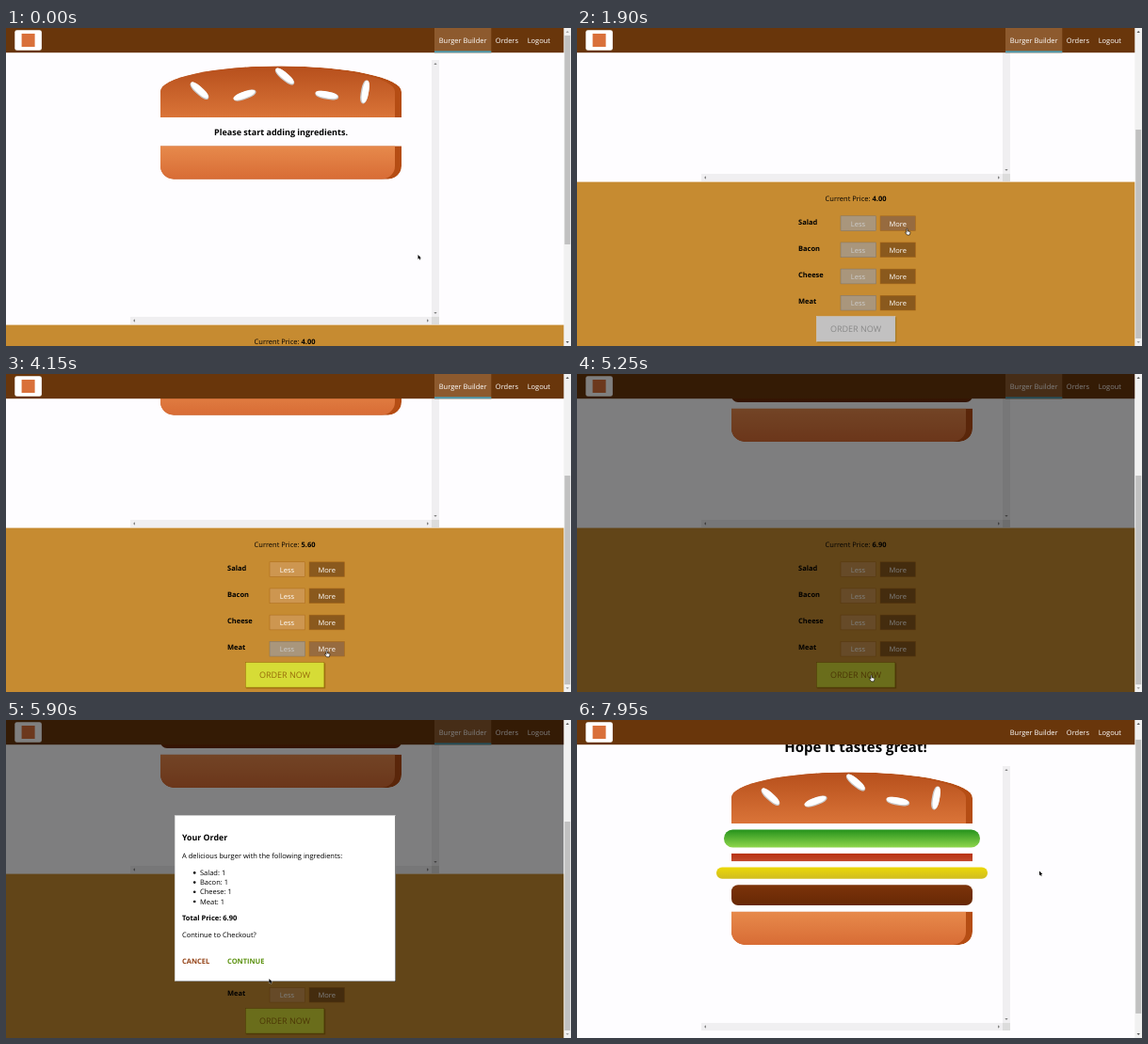
Write an HTML page that moves like this. It is 600x338 px and loops after 8 s.

```html
<!DOCTYPE html>
<html lang="en">
<head>
<meta charset="utf-8">
<title>Burger Builder</title>
<style>
  html, body { margin: 0; width: 100%; height: 100%; overflow: hidden; background: #fefdff; }
  svg { display: block; width: 100vw; height: 100vh; }
  text { font: 7.5px 'Open Sans', sans-serif; text-rendering: geometricPrecision; white-space: pre; }
  .b { font-weight: 700; }
  .mid { text-anchor: middle; }
</style>
</head>
<body>
<svg id="stage" viewBox="0 0 600 338" xmlns="http://www.w3.org/2000/svg"></svg>
<script>
const LOOP = 8000, PAGE_SCROLL = 152;
const MODAL_AT = 5250, LEAVE_AT = 6200, CHECKOUT_AT = 7700;

// name, price, time added, burger layer: width, height, radius, colours
const ITEMS = [
  { name: 'Salad',  price: 0.5, at: 2400, w: 272, h: 19.1, r: 9.4, c: ['#25921c', '#8fd64c'] },
  { name: 'Bacon',  price: 0.7, at: 3050, w: 256, h: 8.2,  r: 0,   c: ['#b83212', '#c2492c'] },
  { name: 'Cheese', price: 0.4, at: 3750, w: 288, h: 12.3, r: 6.1, c: ['#ecd808', '#d0bd20'] },
  { name: 'Meat',   price: 1.3, at: 4400, w: 256, h: 21.8, r: 7,   c: ['#7c330a', '#672805'] }
];
const SEEDS = [[205.5, 66.8, 42], [253.6, 71.6, -20], [296, 51.6, 40], [340.8, 71.6, 10], [381, 68, 100]];
// time, x, y of the pointer tip
const POINTER = [
  [0, 437.5, 241], [1300, 437.5, 241], [2050, 340.5, 210], [2550, 340.5, 210], [2750, 340.5, 238],
  [3250, 340.5, 238], [3500, 340.5, 266], [3900, 340.5, 266], [4150, 340.5, 294], [4550, 340.5, 294],
  [4900, 312.5, 320], [5650, 312.5, 320], [6050, 264.3, 254.5], [6500, 264.3, 254.5],
  [6800, 320, 235], [7500, 491, 160.5], [8000, 491, 160.5]
];

const rect = (x, y, w, h, fill, more = '') =>
  `<rect x="${x}" y="${y}" width="${w}" height="${h}" fill="${fill}" ${more}/>`;
const text = (x, y, str, cls = '', more = '') =>
  `<text x="${x}" y="${y}" class="${cls}" ${more}>${str}</text>`;
const gradient = (id, [a, b]) =>
  `<linearGradient id="${id}" x2="0" y2="1"><stop stop-color="${a}"/><stop offset="1" stop-color="${b}"/></linearGradient>`;
const arrow = (x, y, turn, id = '') =>
  `<path id="${id}" d="M-1.7 1L0-1 1.7 1Z" fill="#858585" transform="translate(${x} ${y}) rotate(${turn})"/>`;
const rowY = i => 199.8 + i * 28.15;

function bun(id, d) {
  return `<clipPath id="${id}Clip"><path d="${d}"/></clipPath>
    <g clip-path="url(#${id}Clip)"><path d="${d}" fill="#b54d14"/>
    <path d="${d}" fill="url(#${id}Fill)" transform="translate(-7)"/></g>`;
}

function seed([x, y, turn]) {
  const shape = fill => rect(-12.5, -4.1, 25, 8.2, fill, 'rx="10" ry="3.6"');
  return `<g transform="translate(${x} ${y}) rotate(${turn})">${shape('#c9c9c9')}
    ${rect(-12.5, -4.1, 24, 6.9, '#fff', 'rx="9.6" ry="3.2"')}</g>`;
}

function burger() {
  const layers = ITEMS.map((m, i) =>
    rect(292 - m.w / 2, 0, m.w, m.h, `url(#layer${i})`, `id="item${i}" rx="${m.r}"`)).join('');
  return `<g id="burger">
    ${bun('top', 'M164 95V67.7A128 27.3 0 0 1 420 67.7V95Z')}${SEEDS.map(seed).join('')}
    ${text(292, 113.6, 'Please start adding ingredients.', 'b mid', 'id="hint" style="font-size:9px"')}
    ${layers}
    <g id="bottom">${bun('base', 'M164 0H420V21.5A14 14 0 0 1 406 35.5H178A14 14 0 0 1 164 21.5Z')}</g>
    ${rect(452, 34, 8, 273, '#f0eff1')}${rect(132, 307, 320, 8, '#f0eff1')}${rect(452, 307, 8, 8, '#dcdcdc')}
    ${arrow(456, 38, 0)}${arrow(456, 303, 180)}${arrow(136, 311, -90)}${arrow(448, 311, 90)}
  </g>`;
}

function footer() {
  const rows = ITEMS.map((m, i) => {
    const y = rowY(i);
    return text(235, y + 8.7, m.name, 'b')
      + rect(280, y, 37.5, 15.8, '', `id="less${i}" stroke-width=".5"`)
      + text(298.5, y + 10.9, 'Less', 'mid', `id="lessText${i}"`)
      + rect(322, y, 37.5, 15.8, '', `id="more${i}" stroke="#aa6817" stroke-width=".5"`)
      + text(340.7, y + 10.9, 'More', 'mid', 'fill="#fff"');
  }).join('');
  return `<g id="footer" transform="translate(0 ${PAGE_SCROLL})">
    ${rect(0, 163.6, 600, 176, '#c68b31')}
    ${text(296, 183.8, 'Current Price: <tspan id="price" class="b"></tspan>', 'mid')}${rows}
    ${rect(255.2, 307.4, 84, 27, '#966909', 'id="orderShadow" opacity=".8"')}
    ${rect(254.3, 306.5, 83.6, 26.6, '', 'id="order" stroke-width=".5"')}
    ${text(296, 323.2, 'ORDER NOW', 'mid', 'id="orderText" style="font-size:9px"')}
  </g>`;
}

function modal() {
  const list = ITEMS.map((m, i) => {
    const y = 165 + i * 10.2;
    return `<circle cx="200.2" cy="${y - 2.6}" r="1.3"/>` + text(206, y, m.name + ': 1');
  }).join('');
  return `<g id="modal">
    ${rect(179.8, 102, 234, 176, '#000')}
    ${rect(179.2, 101.4, 234, 176, '#fff', 'stroke="#ccc" stroke-width=".5"')}
    ${text(187, 127.7, 'Your Order', 'b', 'style="font-size:8.8px"')}
    ${text(187, 147, 'A delicious burger with the following ingredients:')}${list}
    ${text(187, 213.4, 'Total Price: 6.90', 'b')}
    ${text(187, 231.3, 'Continue to Checkout?')}
    ${text(187, 258.5, 'CANCEL', 'b', 'fill="#944317"')}${text(235, 258.5, 'CONTINUE', 'b', 'fill="#5c9210"')}
  </g>`;
}

document.getElementById('stage').innerHTML = `
  <defs>
    ${gradient('topFill', ['#b64f1c', '#da7438'])}${gradient('baseFill', ['#e78a4c', '#d86c35'])}
    ${ITEMS.map((m, i) => gradient('layer' + i, m.c)).join('')}
  </defs>
  ${rect(0, 0, 600, 338, '#fefdff')}
  <g id="scene">
    ${text(296, 49, 'Hope it tastes great!', 'b mid', 'id="heading" style="font-size:15px"')}
    ${burger()}${footer()}
  </g>
  ${rect(0, 0, 600, 26.2, '#69360b')}
  ${rect(9.3, 2.2, 28.6, 21.6, '#fff', 'rx="2.4"')}${rect(16.6, 6, 14, 14, '#d9703a')}
  <g id="nav" fill="#fff">
    <g id="active">${rect(455, 0, 60.3, 26.2, '#8d5a2e')}${rect(455, 24.4, 60.3, 1.8, '#4a9fb8')}</g>
    ${text(459.7, 15.5, 'Burger Builder')}${text(519.8, 15.5, 'Orders')}${text(553.7, 15.5, 'Logout')}
  </g>
  ${rect(0, 0, 592.5, 338, '#000', 'id="backdrop" opacity=".5"')}
  ${modal()}
  <g id="bar">
    ${rect(592.3, 0, 7.7, 338, '#f1f1f1')}${rect(593.2, 0, 6, 222, '#c1c1c1', 'id="thumb"')}
    ${arrow(596.2, 4, 0, 'up')}${arrow(596.2, 334, 180, 'down')}
  </g>
  <g id="pointer">
    <path id="tip" d="M0 0V4.7L1.1 3.7 1.9 5.4 2.7 5.1 1.9 3.4H3.4Z" stroke="#fff" stroke-width=".5" paint-order="stroke"/>
    <path id="hand" d="M-.5.5Q0-.3.6.5V2.7L3 3.2Q3.6 3.5 3.4 4.6L2.8 6.8H.1L-1.9 4.3Q-1.8 3.4-1.1 3.7L-.5 4.3Z"
      fill="#fff" stroke="#000" stroke-width=".6"/>
  </g>`;

const ui = {};
document.querySelectorAll('#stage [id]').forEach(el => { ui[el.id] = el; });
const set = (id, attrs) => { for (const k in attrs) ui[id].setAttribute(k, attrs[k]); };
const show = (id, on) => set(id, { display: on ? 'inline' : 'none' });
const move = (id, x, y) => set(id, { transform: `translate(${x} ${y})` });

const clamp = v => Math.min(1, Math.max(0, v));
const smooth = (t, a, b) => { const p = clamp((t - a) / (b - a)); return p * p * (3 - 2 * p); };

// CSS ease-out: cubic-bezier(0, 0, .58, 1)
function easeOut(p) {
  let lo = 0, hi = 1;
  for (let i = 0; i < 24; i++) {
    const s = (lo + hi) / 2;
    if (1.74 * (1 - s) * s * s + s ** 3 < p) lo = s; else hi = s;
  }
  return lo * lo * (3 - 2 * lo);
}

function pointerAt(t) {
  const i = POINTER.findIndex((k, n) => n && t <= k[0]);
  const [t0, x0, y0] = POINTER[i - 1], [t1, x1, y1] = POINTER[i];
  const p = smooth(t, t0, t1);
  return [x0 + (x1 - x0) * p, y0 + (y1 - y0) * p];
}

function render(t) {
  const building = t < LEAVE_AT, checkout = t >= CHECKOUT_AT;
  const dialog = t > MODAL_AT && building;
  const [px, py] = pointerAt(t);
  const over = (x, y, w, h) => building && px >= x && px <= x + w && py >= y && py <= y + h;
  const has = i => checkout || t >= ITEMS[i].at;
  const any = has(0);

  // page, scrolling
  const max = checkout ? 36 : PAGE_SCROLL, view = checkout ? 291 : 222;
  const scroll = checkout ? 15 * smooth(t, 7750, 7950) : PAGE_SCROLL * smooth(t, 480, 920);
  move('scene', 0, -scroll);
  show('scene', building || checkout);
  show('footer', building);
  show('heading', checkout);
  show('bar', building || checkout);
  set('thumb', { y: 8 + (322 - view) * scroll / max, height: view });
  set('up', { fill: scroll > 0 ? '#505050' : '#a3a3a3' });
  set('down', { fill: scroll < max ? '#505050' : '#a3a3a3' });
  move('nav', building || checkout ? 0 : 7.8, 0);
  show('active', building);

  // burger
  move('burger', 0, checkout ? 30 : 0);
  show('hint', !any);
  let y = 101.4, price = 4;
  ITEMS.forEach((m, i) => {
    show('item' + i, has(i));
    if (!has(i)) return;
    set('item' + i, { y });
    y += m.h + 6.4;
    price += m.price;
  });
  move('bottom', 0, any ? y : 125.2);

  // controls
  let hand = false;
  ui.price.textContent = price.toFixed(2);
  ITEMS.forEach((m, i) => {
    const hit = over(322, rowY(i), 37.5, 15.8);
    hand = hand || hit;
    set('more' + i, { fill: hit && !dialog ? '#976b3f' : '#8a591d' });
    set('less' + i, has(i) ? { fill: '#cd9650', stroke: '#aa6817' } : { fill: '#a9967c', stroke: '#7e7365' });
    set('lessText' + i, { fill: has(i) ? '#fff' : '#ccc' });
  });
  const onOrder = any && over(254.3, 306.5, 83.6, 26.6);
  set('order', {
    fill: !any ? '#c2c1c1' : onOrder && !dialog ? '#a0e840' : '#d6dc36',
    stroke: any ? '#966909' : '#ccc'
  });
  set('orderText', { fill: any ? '#966909' : '#888' });
  hand = hand || onOrder;

  // dialog
  const p = easeOut(clamp((t - MODAL_AT) / 300));
  show('backdrop', dialog);
  show('modal', dialog);
  set('modal', { opacity: p });
  move('modal', 0, -338 * (1 - p));
  if (dialog && t > 5650) hand = over(235, 247, 41, 18);

  move('pointer', px, py);
  show('hand', hand);
  show('tip', !hand);
}

const start = performance.now();
(function tick() {
  render((performance.now() - start) % LOOP);
  requestAnimationFrame(tick);
})();
</script>
</body>
</html>
```
